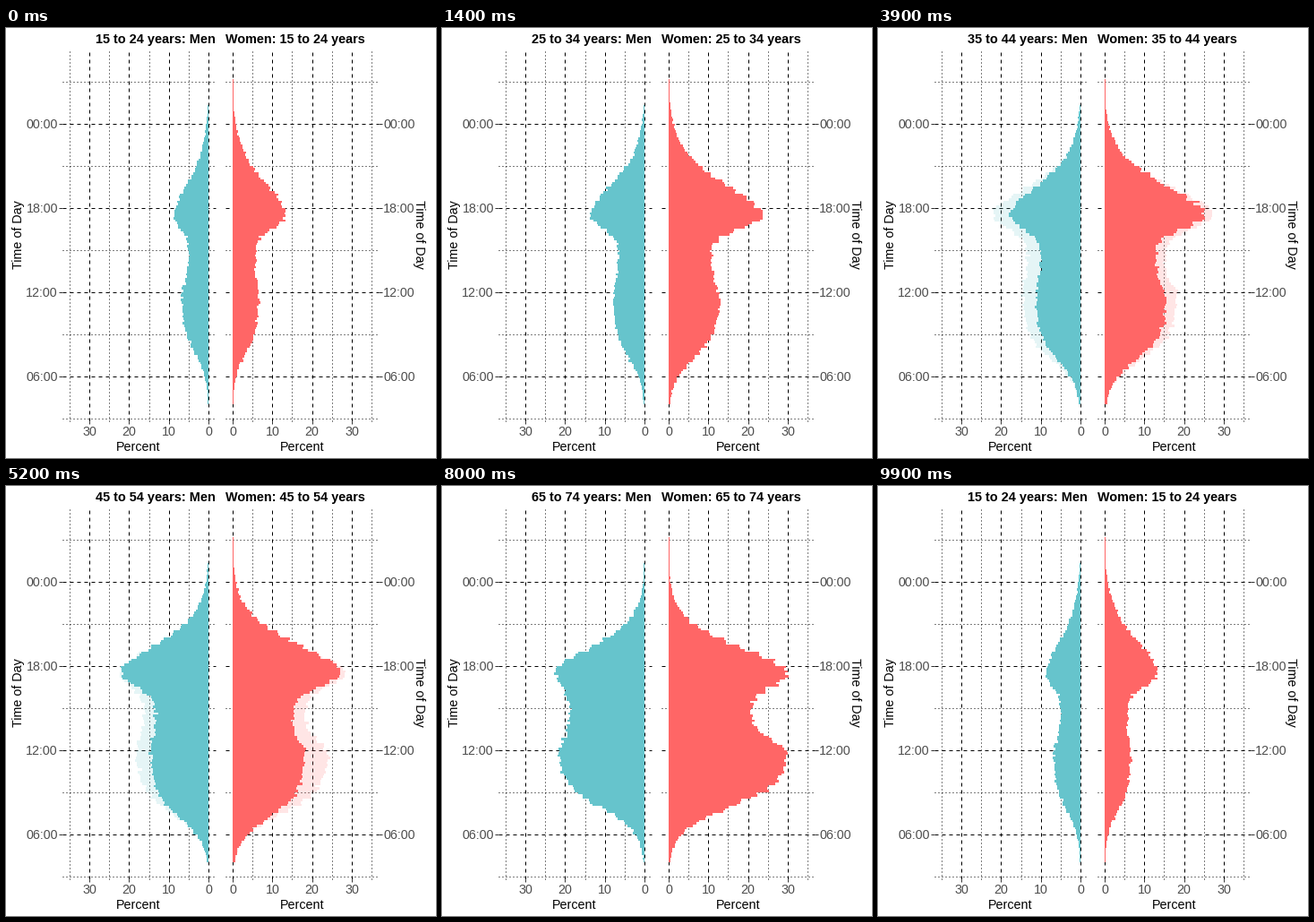
Animation of 480 by 480 pixels, one loop 10000 ms. Source, as a matplotlib script:

```python
import numpy as np
import matplotlib.pyplot as plt
from matplotlib.animation import FuncAnimation

plt.rcParams["font.family"] = "Liberation Sans"
PX = 0.72  # points per pixel at 100 dpi
TEAL, RED = "#66C4CC", "#FF6666"
GREY, TICK = "#4D4D4D", "#333333"
DASHED, DOTTED = (0, (4, 4)), (0, (1, 3))
ZERO_M, ZERO_W, UNIT = 226, 253, 4.433
TOP, BOTTOM = 25, 438.6
SPAN_M, SPAN_W = (62.6, 233.6), (245.4, 416.4)

AGES = [f"{a} to {a + 9} years" for a in range(15, 75, 10)]
AGES.append("75 years and older")
STARTS = [9, 24, 39, 52, 66, 80, 94]  # first frame of each cross-fade
STEPS = 6

BINS = 144
edge_hours = 4 + np.arange(BINS + 1) / 6
mids = edge_hours[:-1] + 1 / 12
rng = np.random.default_rng(7)


def row(hour):
    return 388.5 - (hour - 6) * 94 / 6


def by_age(i, *levels):
    """Percent for age group i, between key groups."""
    return np.interp(i, [0, 1, 3, 5, 6], levels)


def day_curve(t, i, morning, dip, evening):
    """Morning rise, afternoon dip, evening peak and a slow fall."""
    rise = 1 / (1 + np.exp(-(t - 7.1 - 0.1 * (i - 2.2) ** 2) / 0.9))
    noon = np.exp(-(np.maximum(t - 11.6, 0) / 1.4) ** 2)
    peak = np.exp(-(np.maximum(17.4 - t, 0) / 1.2) ** 2)
    fall = np.exp(-(np.maximum(t - 17.6, 0) / (3.35 - 0.15 * i)) ** 1.6)
    return rise * fall * (dip + (morning - dip) * noon + (evening - dip) * peak)


def profile(i, levels, last):
    """Ten-minute bars that tend to step on the half hour."""
    half = np.floor(mids * 2) / 2 + 0.25
    v = (day_curve(mids, i, *levels) + day_curve(half, i, *levels)) / 2
    v = v + rng.normal(0, 0.08, BINS) * np.sqrt(v)
    v = np.where(mids > 20, np.maximum(v, 0.25), v)
    return np.where(mids < last, v, 0)


men = [profile(i, (by_age(i, 6.8, 7.8, 14.6, 21.8, 22),
                   by_age(i, 5, 6.5, 13.5, 19, 17.6),
                   by_age(i, 8.6, 13.7, 22, 22.5, 18.5)), 25.3)
       for i in range(7)]
women = [profile(i, (by_age(i, 6.6, 12.8, 18.2, 30.3, 27),
                     by_age(i, 5.7, 10.7, 15, 21, 18.6),
                     by_age(i, 13.4, 23.4, 27.2, 29.7, 22.4)), 27.2)
         for i in range(7)]

fig = plt.figure(figsize=(4.8, 4.8), dpi=100, facecolor="white")
ax = fig.add_axes([0, 0, 1, 1])
ax.axis("off")


def line(x, y, color="black", style="-"):
    ax.plot(x, y, color=color, ls=style, lw=PX,
            dash_capstyle="butt", solid_capstyle="butt", zorder=1)


def label(x, y, s, size=14.2, color="black", **kw):
    return ax.text(x, y, s, fontsize=size * PX, color=color, zorder=5, **kw)


def panel(zero, sign, span):
    side = span[0] if sign < 0 else span[1]
    for hour in range(3, 28, 3):
        y = row(hour) + 0.3  # settles on one pixel row
        line(span, (y, y), style=DOTTED if hour % 6 else DASHED)
        if hour % 6 == 0:
            line((side, side + sign * 3.6), (y, y), TICK)
            label(side + sign * 4.7, row(hour) + 5, f"{hour % 24:02d}:00",
                  color=GREY, ha="right" if sign < 0 else "left")
    for pct in range(0, 36, 5):
        x = zero + sign * pct * UNIT
        line((x, x), (BOTTOM, TOP), style=DOTTED if pct % 10 else DASHED)
        if pct % 10 == 0:
            line((x, x), (BOTTOM, BOTTOM + 3.6), TICK)
            label(x, 455, str(pct), color=GREY, ha="center")
    label(sum(span) / 2, 472, "Percent", ha="center")


panel(ZERO_M, -1, SPAN_M)
panel(ZERO_W, 1, SPAN_W)
for x, turn in ((14, 90), (461.5, -90)):
    label(x, 230.5, "Time of Day", rotation=turn, ha="center", va="center")
title_m = label(234, 17, "", 14.5, weight="bold", ha="right")
title_w = label(245, 17, "", 14.4, weight="bold", ha="left")


def bars(zero, color, z):
    return ax.stairs(np.full(BINS, float(zero)), row(edge_hours),
                     baseline=zero, orientation="horizontal", fill=True,
                     color=color, lw=0, antialiased=False, zorder=z)


old = bars(ZERO_M, TEAL, 2), bars(ZERO_W, RED, 2)
new = bars(ZERO_M, TEAL, 3), bars(ZERO_W, RED, 3)
ax.set_xlim(0, 480)
ax.set_ylim(480, 0)


def show(pair, i):
    pair[0].set_data(values=ZERO_M - men[i] * UNIT)
    pair[1].set_data(values=ZERO_W + women[i] * UNIT)


def update(frame):
    n = sum(s <= frame for s in STARTS)
    step = frame - STARTS[n - 1] + 1 if n else STEPS
    fading = step < STEPS
    now = n % len(AGES)
    show(old, n - 1 if fading else now)
    show(new, now)
    for p in new:
        p.set_visible(fading)
        p.set_alpha(min(step / STEPS, 1))
    age = AGES[n - 1 if step < STEPS / 2 else now]
    title_m.set_text(f"{age}: Men")
    title_w.set_text(f"Women: {age}")
    return *old, *new, title_m, title_w


anim = FuncAnimation(fig, update, frames=100, interval=100, repeat=True,
                     repeat_delay=0, blit=False)
plt.show()
```
